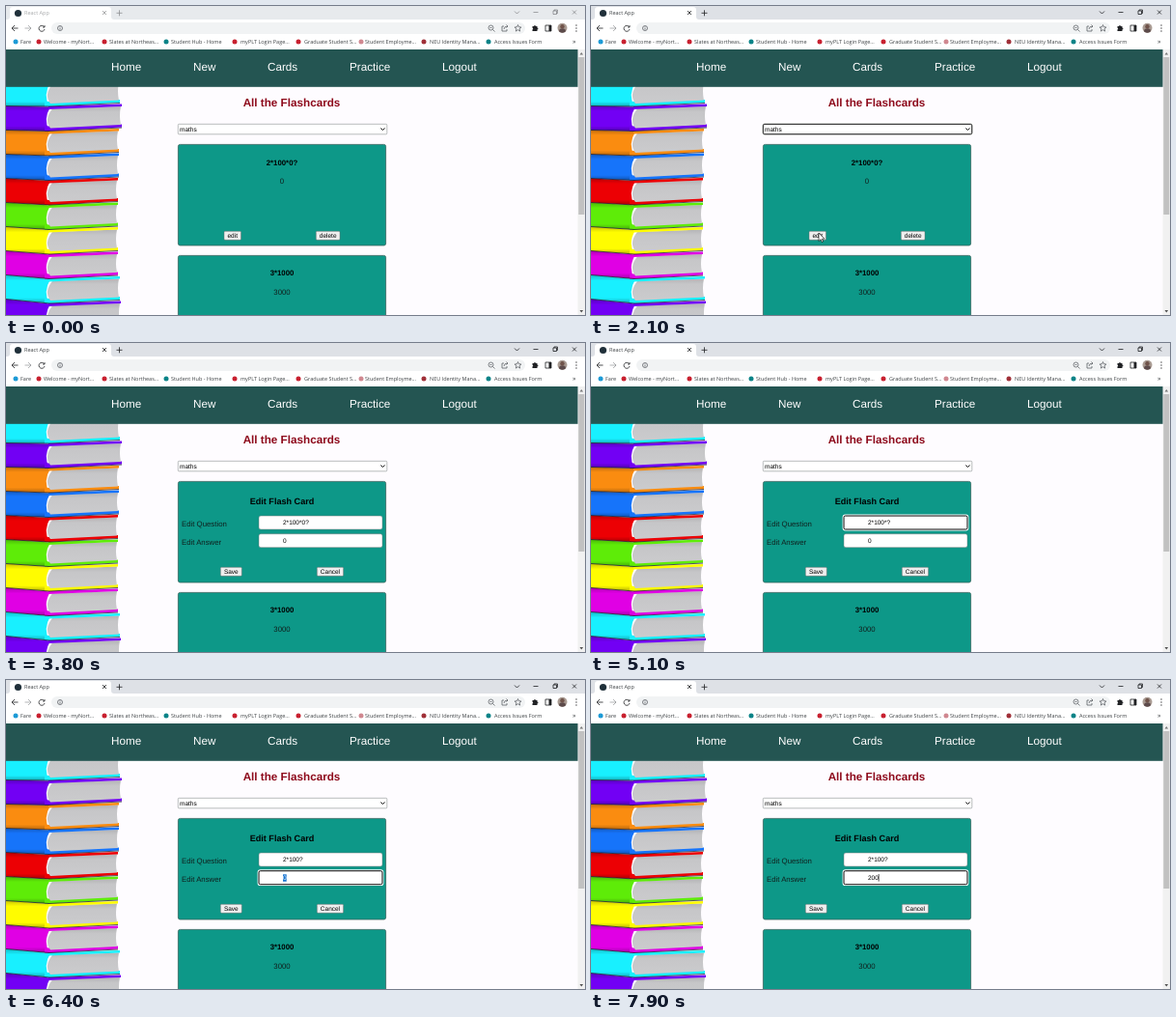
Recreate the animation shown at these times as an HTML page. Size 600 px wide and 320 px high, loop 8000 ms.

```html
<!DOCTYPE html>
<html lang="en">
<head>
<meta charset="utf-8">
<title>Flashcards</title>
<style>
html, body { margin: 0; width: 100%; height: 100%; overflow: hidden; background: #fff; }
svg { display: block; width: 600px; height: 320px; text-rendering: geometricPrecision; }
text { font: 7.8px "Liberation Sans", Arial, sans-serif; fill: #10201e; }
.chrome text { font: 5.5px "Open Sans", sans-serif; fill: #3c4043; }
.chrome .url { font-size: 5.7px; fill: #202124; }
.line { fill: none; stroke: #5f6368; stroke-width: .8; }
.dark { stroke: #202124; }
#frame { fill: #dee1e6; }
.inactive #frame { fill: #e7eaed; }
.inactive .window { opacity: .45; }
.nav text { font-size: 11.7px; fill: #fff; }
.title { font-size: 11.7px; font-weight: bold; fill: #8e0b1c; text-anchor: middle; }
.card rect.face { fill: #0d9888; stroke: #38655f; stroke-width: .8; }
.mid { text-anchor: middle; }
.bold { font-weight: bold; fill: #000; }
.head { font-size: 9.1px; }
.small { font-size: 6.5px; fill: #000; }
.button rect { fill: #efefef; stroke: #686868; stroke-width: .5; }
.field { fill: #fff; stroke: #737b7a; stroke-width: .5; }
.ring rect { fill: none; }
</style>
</head>
<body>
<svg id="stage" viewBox="0 0 600 320">
  <defs>
    <linearGradient id="paper" x1="0" y1="0" x2="0" y2="1">
      <stop offset="0" stop-color="#b4b4b6"/>
      <stop offset=".25" stop-color="#c6c6c8"/>
      <stop offset="1" stop-color="#cbcbcd"/>
    </linearGradient>
    <linearGradient id="shade" x1="0" y1="0" x2="0" y2="1">
      <stop offset="0" stop-opacity=".22"/>
      <stop offset=".2" stop-opacity="0"/>
      <stop offset=".8" stop-opacity="0"/>
      <stop offset="1" stop-opacity=".28"/>
    </linearGradient>
  </defs>

  <rect width="600" height="320" fill="#fefcff"/>
  <g id="books"></g>

  <g class="chrome" id="chrome">
    <rect id="frame" width="600" height="14"/>
    <path d="M1 14Q4 14 4 11V4Q4 1 7 1H106Q109 1 109 4V11Q109 14 112 14Z" fill="#fff"/>
    <rect y="14" width="600" height="31" fill="#fff"/>
    <rect x="47" y="17" width="491" height="12" rx="6" fill="#f1f3f4"/>
    <circle cx="12.5" cy="7.5" r="3.6" fill="#20303a"/>
    <g class="window">
      <text x="19" y="9.300">React App</text>
      <path class="line dark" d="M100 5l4 4m0-4l-4 4M114.500 7.300h6m-3-3v6M527 5.500l2.500 2.500 2.500-2.500
        M546.500 6.500h5M567 5h3.500v3.500h-3.500zM568 5v-1h3.500v3.500h-1M587 4.500l4 4m0-4l-4 4"/>
    </g>
    <path class="line dark" d="M12.500 23h-6.500m3-3l-3 3 3 3M39.500 21.500a3 3 0 1 0 .5 2.500m0-4v2h-2M559 20h6v6h-6z"/>
    <path d="M562.500 20h2.500v6h-2.500zM545.500 21h1.500q1-2 2 0h1.500v1.500q2 1 0 2v1.500h-5v-1.500q1.500-1 0-2z" fill="#202124"/>
    <path class="line" d="M504.500 24.500l2 2M501.500 22.500h2M516 21h-2v5h5v-2M516 24q0-3 4-3m-1.500-1.500l1.500 1.500-1.500 1.500
      M530.500 19.500l1 2.300 2.500.2-1.900 1.600.6 2.500-2.200-1.400-2.200 1.400.6-2.500-1.900-1.600 2.500-.2z"/>
    <path class="line" d="M19.500 23h6.500m-3-3l3 3-3 3" opacity=".6"/>
    <circle class="line" cx="502.500" cy="22.500" r="2.500"/>
    <circle class="line" cx="56" cy="23" r="2.500"/>
    <path class="line" d="M56 22.500v2M56 21.300v.5"/>
    <circle cx="576.500" cy="22.800" r="5" fill="#a99b92"/>
    <path d="M573 26.300q0-3 3.500-3t3.500 3q-3.500 3-7 0" fill="#5c4a4a"/>
    <circle cx="576.500" cy="21.300" r="2.200" fill="#70534a"/>
    <path d="M591 19.900v.1M591 22.900v.1M591 25.900v.1" stroke="#303134" stroke-width="1.300" stroke-linecap="round"/>
    <g id="bookmarks"></g>
    <text x="587" y="39" style="font-size:7px">»</text>
  </g>

  <g class="nav">
    <rect y="45" width="593" height="38.800" fill="#245552"/>
    <text x="109" y="67.400">Home</text>
    <text x="194" y="67.400">New</text>
    <text x="271" y="67.400">Cards</text>
    <text x="356" y="67.400">Practice</text>
    <text x="452" y="67.400">Logout</text>
  </g>

  <rect x="592.500" y="45" width="7.500" height="275" fill="#f1f1f1"/>
  <rect x="593.300" y="53" width="6" height="163" fill="#c1c1c1"/>
  <path d="M594.500 50.500l1.800-2.500 1.800 2.500z" fill="#777"/>
  <path d="M594.500 315l1.800 2.500 1.800-2.500z" fill="#505050"/>

  <text class="title" x="296" y="104">All the Flashcards</text>
  <rect class="field" x="178.300" y="122.300" width="216.500" height="10.500" rx="1"/>
  <text class="small" x="180" y="130">maths</text>
  <path d="M388.500 126.500l2 2 2-2" fill="none" stroke="#000" stroke-width="1"/>

  <g class="card">
    <rect class="face" x="178.400" y="143.400" width="215.200" height="104.600" rx="2"/>
    <rect class="face" x="178.400" y="258.400" width="215.200" height="104.600" rx="2"/>
    <text class="mid bold" x="286" y="279.300">3*1000</text>
    <text class="mid" x="286" y="299.200">3000</text>
  </g>

  <g id="view">
    <text class="mid bold" x="286" y="164.700">2*100*0?</text>
    <text class="mid" x="286" y="184.200">0</text>
  </g>

  <g id="form">
    <text class="mid bold head" x="286" y="167">Edit Flash Card</text>
    <text x="182" y="190.300">Edit Question</text>
    <text x="182" y="209.300">Edit Answer</text>
    <rect class="field" x="262" y="179" width="128" height="14" rx="2"/>
    <rect class="field" x="262" y="197.700" width="128" height="14" rx="2"/>
    <rect id="selection" x="287" y="201.300" width="3.700" height="7.400" fill="#1473d0"/>
    <text class="small" id="question" x="287" y="188.200"></text>
    <text class="small" id="answer" x="287" y="207.200"></text>
  </g>

  <g class="ring" id="ring">
    <rect id="ringOuter" rx="2" stroke="#fff" stroke-width="1.800"/>
    <rect id="ringInner" rx="1.500" stroke="#101010" stroke-width="1"/>
  </g>
  <path id="caret" d="M0 0v7.600" stroke="#000" stroke-width=".7"/>
  <path id="pointer" d="M0 0V8.500L2 6.700 3.300 9.600 4.600 9 3.300 6.200H6Z" fill="#fff" stroke="#000" stroke-width=".6"/>
</svg>

<script>
const $ = id => document.getElementById(id);
const DURATION = 8000;

function add(parent, tag, attrs, text = "") {
  const node = document.createElementNS($("stage").namespaceURI, tag);
  for (const key in attrs) node.setAttribute(key, attrs[key]);
  node.textContent = text;
  return parent.appendChild(node);
}

function drawBooks() {
  const colors = ["#18f0ff", "#7200f4", "#fa8c10", "#1674fa", "#ec0004",
                  "#5eec08", "#fffc00", "#e000e4", "#18f0ff", "#7200f4"];
  const ends = [118, 120, 117, 117, 116, 116, 116, 116, 118, 119];
  const books = $("books");
  for (let i = colors.length - 1; i >= 0; i--) {
    const base = 104 + 25.5 * i, tilt = 0.5 + 0.5 * i, end = ends[i];
    const spine = `M0 ${base - 25 - tilt}L46 ${base - 25}Q38 ${base - 12} 45 ${base}L0 ${base - tilt}Z`;
    const lowerCover = `M40 ${base - 5}L${end} ${base - 7}v3L45 ${base}L40 ${base}Z`;
    const pages = `M48 ${base - 23}Q39 ${base - 12} 46 ${base - 3}L${end - 1} ${base - 6.5}` +
      `Q${end - 3} ${base - 16} ${end - 1} ${base - 25.5}Z`;
    const upperCover = `M44 ${base - 25.5}L${end} ${base - 28}v2.500L44 ${base - 22.5}Z`;
    add(books, "path", { d: spine, fill: colors[i] });
    add(books, "path", { d: spine, fill: "url(#shade)" });
    add(books, "path", { d: lowerCover, fill: colors[i] });
    add(books, "path", { d: pages, fill: "url(#paper)" });
    add(books, "path", { d: upperCover, fill: colors[i] });
    add(books, "path", {
      d: `M0 ${base - tilt}L45 ${base}L${end} ${base - 3.5}`,
      fill: "none", stroke: "#181828", "stroke-opacity": 0.75, "stroke-width": 1
    });
  }
}

function drawBookmarks() {
  const red = "#c8202f", teal = "#078387";
  const marks = [
    [10, 15, "Fare", "#1c9ad6"],
    [34, 39, "Welcome - myNort...", red],
    [102, 107, "Slates at Northeas...", red],
    [166, 171, "Student Hub - Home", teal],
    [237, 243, "myPLT Login Page...", red],
    [303, 309, "Graduate Student S...", red],
    [368, 372, "Student Employme...", "#d08890"],
    [433, 439, "NEU Identity Mana...", "#a03038"],
    [500, 506, "Access Issues Form", teal]
  ];
  for (const [iconX, textX, label, fill] of marks) {
    add($("bookmarks"), "circle", { cx: iconX, cy: 37, r: 2.5, fill });
    add($("bookmarks"), "text", { x: textX, y: 38.7 }, label);
  }
}

function drawButton(parent, x, width, y, label) {
  const group = add(parent, "g", { class: "button" });
  add(group, "rect", { x, y, width, height: 9, rx: 1 });
  add(group, "text", { class: "small mid", x: x + width / 2, y: y + 6.8 }, label);
}

const boxes = {
  subject: [178.3, 122.3, 216.5, 10.5],
  question: [262, 179, 128, 14],
  answer: [262, 197.7, 128, 14]
};

// Each step changes only the properties it names.
const steps = [
  [0, { active: false, editing: false, focus: "", question: "2*100*0?", answer: "0",
        caret: -1, selected: false, pointer: null }],
  [500, { active: true, focus: "subject" }],
  [1600, { pointer: [272, 198] }],
  [2100, { pointer: [236, 235] }],
  [2500, { editing: true, focus: "", pointer: [237, 234.5] }],
  [3200, { pointer: [252, 221] }],
  [3300, { pointer: [280, 201] }],
  [3400, { pointer: null }],
  [4300, { focus: "question", caret: 8 }],
  [4800, { caret: 7 }],
  [5100, { question: "2*100*?", caret: -1 }],
  [5300, { question: "2*100?", caret: 5 }],
  [5800, { caret: -1 }],
  [6400, { focus: "answer", selected: true }],
  [7000, { answer: "2", selected: false, caret: 1 }],
  [7400, { answer: "20", caret: 2 }],
  [7600, { answer: "200", caret: -1 }],
  [7900, { caret: 3 }]
];

const show = (id, on) => $(id).setAttribute("visibility", on ? "visible" : "hidden");
const move = (id, x, y) => $(id).setAttribute("transform", `translate(${x} ${y})`);
const textWidth = text => [...text].reduce((sum, c) => sum + (c === "*" ? 0.389 : 0.556) * 6.5, 0);

function placeRing([x, y, width, height]) {
  for (const [id, gap] of [["ringOuter", 0.5], ["ringInner", 0]]) {
    const box = { x: x - gap, y: y - gap, width: width + 2 * gap, height: height + 2 * gap };
    for (const key in box) $(id).setAttribute(key, box[key]);
  }
}

function render(state) {
  $("chrome").classList.toggle("inactive", !state.active);
  show("view", !state.editing);
  show("form", state.editing);
  show("selection", state.editing && state.selected);
  show("ring", state.focus);
  show("caret", state.caret >= 0);
  show("pointer", state.pointer);
  $("question").textContent = state.question;
  $("answer").textContent = state.answer;
  $("answer").style.fill = state.selected ? "#fff" : "#000";
  if (state.focus) placeRing(boxes[state.focus]);
  if (state.caret >= 0) {
    const typed = state[state.focus].slice(0, state.caret);
    move("caret", 287.3 + textWidth(typed), boxes[state.focus][1] + 3.3);
  }
  if (state.pointer) move("pointer", ...state.pointer);
}

drawBooks();
drawBookmarks();
drawButton($("view"), 226, 17.5, 233.3, "edit");
drawButton($("view"), 321.3, 24.7, 233.3, "delete");
drawButton($("form"), 222.3, 22, 232.3, "Save");
drawButton($("form"), 322.3, 27.3, 232.3, "Cancel");

const start = performance.now();
let current = -1;
function tick() {
  const time = (performance.now() - start) % DURATION;
  const count = steps.filter(([at]) => at <= time).length;
  if (count !== current) {
    current = count;
    render(Object.assign({}, ...steps.slice(0, count).map(([, change]) => change)));
  }
  requestAnimationFrame(tick);
}
tick();
</script>
</body>
</html>
```
